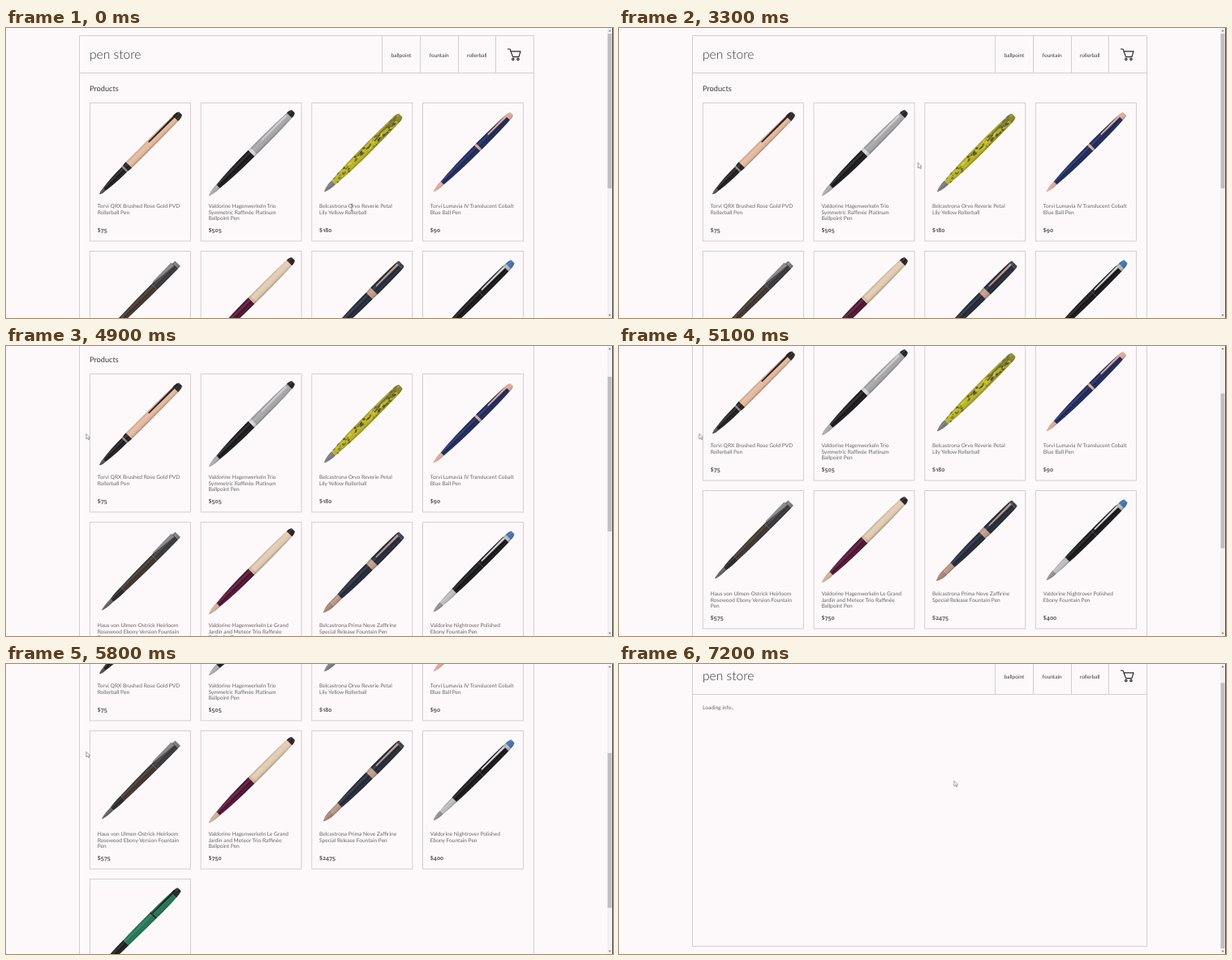
An HTML page for the animation above (8 s loop, 748 px wide and 358 px high).

```html
<!DOCTYPE html>
<html lang="en">
<head>
<meta charset="utf-8">
<title>pen store</title>
<style>
  html, body { margin: 0; width: 100%; height: 100%; overflow: hidden; background: #fdf9fa; }
  svg { display: block; width: 748px; height: 358px; }
  text { font-family: Lato, "Open Sans", sans-serif; font-size: 6.6px; fill: #686567; text-rendering: geometricPrecision; }
  .logo { font-size: 15.6px; font-weight: 300; fill: #333; }
  .heading { font-size: 9.2px; fill: #3c3a3b; }
  .nav { font-size: 6.5px; text-anchor: middle; fill: #3c3a3b; }
  .price { font-family: "Open Sans", "Noto Sans", sans-serif; font-size: 7.1px; font-weight: 600; font-variant-numeric: oldstyle-nums; fill: #454244; }
  .line { fill: none; stroke: #d3cfd1; }
</style>
</head>
<body>
<svg viewBox="0 0 748 358">
  <defs>
    <linearGradient id="shade" x2="0" y2="1">
      <stop offset="0" stop-color="#000" stop-opacity=".12"/>
      <stop offset=".3" stop-color="#fff" stop-opacity=".16"/>
      <stop offset=".55" stop-color="#fff" stop-opacity="0"/>
      <stop offset="1" stop-color="#000" stop-opacity=".3"/>
    </linearGradient>
  </defs>
  <g id="page">
    <path id="frame" class="line"/>
    <path class="line" d="M90.5 55.5H650.5M463.5 9.5v46M510.5 9.5v46M557.5 9.5v46M603.5 9.5v46"/>
    <text class="logo" x="103" y="38">pen store</text>
    <text class="nav" x="487" y="35.5">ballpoint</text>
    <text class="nav" x="533.7" y="35.5">fountain</text>
    <text class="nav" x="580.3" y="35.5">rollerball</text>
    <g fill="none" stroke="#2b292a" stroke-width="1.2" stroke-linejoin="round">
      <path d="M618 26h3l3.6 9.6h7.4l2-6.8h-12"/>
      <circle cx="624.8" cy="38.6" r="1.2"/><circle cx="631" cy="38.6" r="1.2"/>
    </g>
    <g id="products"><text class="heading" x="103" y="77.5">Products</text></g>
    <text id="loading" x="103" y="55.7" dy="18">Loading info..</text>
  </g>
  <path fill="#f3f0f1" d="M741 0h6v358h-6z"/>
  <path fill="#777" d="M742.3 4.2l1.7-2 1.7 2zM742.3 353.8l1.7 2 1.7-2z"/>
  <rect id="thumb" x="741.4" width="5" fill="#c0bebf"/>
  <path fill="#444" d="M747 0h1v358h-1z"/>
  <path id="beam" d="M424.5 217.5h3M424.5 225.5h3M426 217.5v8" stroke="#777" stroke-width=".8"/>
  <path id="arrow" d="M.4 .3v6.6l1.6-1.4 1.2 2.4 1-.5-1.1-2.3h2.1z" fill="#fff" stroke="#777" stroke-width=".7"/>
</svg>
<script>
const LOOP = 8000, STEP = 100, VIEW = 358;
const SCROLL_START = 4600, SCROLL_EASE = 5400, SCROLL_END = 6000, PAGE_CHANGE = 7200;
const el = id => document.getElementById(id);

function add(parent, tag, attrs, text = '') {
  const node = document.createElementNS('http://www.w3.org/2000/svg', tag);
  for (const name in attrs) node.setAttribute(name, attrs[name]);
  node.textContent = text;
  return parent.appendChild(node);
}

// parts run from the tip upwards: [colour, distance of the far end, half width there]
const products = [
  { title: ['Torvi QRX Brushed Rose Gold PVD', 'Rollerball Pen'], price: '$75', tip: [12, 112.5],
    parts: [['#4a4849', 8, 2.2], ['#1a181a', 43, 4.4], ['#8a8081', 45, 4.6], ['#1d1b1d', 51, 5.2], ['#e6b99c', 132, 4.6], ['#2a2627', 141, 2.6]],
    clip: ['#262223', 88, 139] },
  { title: ['Valdorine Hagenwerkeln Trio', 'Symmetric Raffinée Platinum', 'Ballpoint Pen'], price: '$505', tip: [10, 114.5],
    parts: [['#a9a9ab', 16, 3], ['#141417', 74, 5.4], ['#d5d5d7', 78, 5.6], ['#a6a6a9', 140, 4.4], ['#1c1c1e', 147, 2.4]],
    clip: ['#cfcfd1', 94, 137] },
  { title: ['Belcastrona Orvo Reverie Petal', 'Lily Yellow Rollerball'], price: '$180', tip: [15.5, 109.5], marbled: true,
    parts: [['#77777b', 16, 3.4], ['#b9b31f', 75, 5.7], ['#b9b31f', 124, 5], ['#8b8628', 133, 3]],
    clip: ['#77743a', 92, 128] },
  { title: ['Torvi Lumavia IV Translucent Cobalt', 'Blue Ball Pen'], price: '$90', tip: [13.5, 109.5],
    parts: [['#dfa794', 15, 2.7], ['#182457', 76, 5], ['#dfa794', 79, 5.1], ['#182457', 129, 4], ['#dfa794', 136, 2.4]],
    clip: ['#e0ab9a', 97, 132] },
  { title: ['Haus von Ulmen-Ostrick Heirloom', 'Rosewood Ebony Version Fountain', 'Pen'], price: '$575', tip: [15, 108.5],
    parts: [['#5c5b5d', 17, 2.4], ['#232224', 36, 3.8], ['#3a2f29', 91, 4.9], ['#343335', 128, 4.6], ['#77777a', 132, 4.2]],
    clip: ['#8b8b8e', 94, 127], raised: 2.6 },
  { title: ['Valdorine Hagenwerkeln Le Grand', 'Jardin and Meteor Trio Raffinée', 'Ballpoint Pen'], price: '$750', tip: [10, 113.5],
    parts: [['#cfae91', 16, 3], ['#4c0d2d', 74, 5.4], ['#d9b79a', 78, 5.6], ['#e2cbb0', 140, 4.6], ['#241b1d', 147, 2.4]],
    clip: ['#e6cdb4', 94, 137] },
  { title: ['Belcastrona Prima Nove Zaffirine', 'Special Release Fountain Pen'], price: '$2475', tip: [14.5, 111.5],
    parts: [['#a78272', 15, 3.6], ['#bb9380', 28, 3.8], ['#1d2433', 80, 5.6], ['#c39a85', 88, 6], ['#1f2635', 132, 5.4], ['#353a48', 136, 4.2]],
    clip: ['#c49d89', 94, 132] },
  { title: ['Valdorine Nightrover Polished', 'Ebony Fountain Pen'], price: '$400', tip: [13.5, 110.5],
    parts: [['#8d8d90', 14, 2.8], ['#bcbcbf', 36, 4], ['#111113', 82, 5.1], ['#111113', 126, 4.8], ['#b8b8bb', 130, 4.4], ['#3c6fae', 138, 2.6]],
    clip: ['#d4d4d6', 86, 126] },
  { title: [], price: '', tip: [12, 111],
    parts: [['#4a4849', 8, 2.2], ['#151817', 46, 4.6], ['#1d7355', 92, 5.2], ['#17251f', 95, 5.2], ['#1d7355', 129, 4.4], ['#1c2421', 139, 2.6]],
    clip: ['#1b2822', 94, 134] },
];

// Sides bulge towards the wider end of a part.
function partOutline(start, half, end, endHalf) {
  const bend = start + (end - start) * (endHalf > half ? 0.4 : 0.75), wide = Math.max(half, endHalf);
  return `M${start} ${-half}Q${bend} ${-wide} ${end} ${-endHalf}V${endHalf}Q${bend} ${wide} ${start} ${half}z`;
}

function drawPen(card, { parts, tip, clip, marbled, raised = 0 }) {
  const pen = add(card, 'g', { transform: `translate(${tip}) rotate(-45)` });
  let start = 0, half = 0.5;
  for (const [fill, end, endHalf] of parts) {
    const d = partOutline(start, half, end, endHalf);
    add(pen, 'path', { d, fill });
    add(pen, 'path', { d, fill: 'url(#shade)' });
    [start, half] = [end, endHalf];
  }
  if (marbled) drawMarbling(pen);
  const [fill, from, to] = clip;
  add(pen, 'path', { d: `M${from} ${-3.4 - raised}L${to} ${-4 - raised}V-1.4L${from} ${-1.8 - raised}z`, fill });
}

function drawMarbling(pen) {
  let seed = 7;
  const random = () => (seed = seed * 16807 % 2147483647) / 2147483647;
  const tones = ['#35341f', '#5b5926', '#dcd733', '#7f7f78', '#45442a'];
  for (let i = 0; i < 90; i++) {
    add(pen, 'ellipse', {
      cx: 20 + random() * 104, cy: random() * 8 - 4, rx: 1 + random() * 2, ry: 0.5 + random() * 0.8,
      fill: tones[i % tones.length], opacity: 0.75,
    });
  }
}

products.forEach((product, i) => {
  const x = 103.4 + i % 4 * 136.7, y = 92.5 + Math.floor(i / 4) * 183;
  const card = add(el('products'), 'g', { transform: `translate(${x} ${y})` });
  add(card, 'rect', { class: 'line', width: 124, height: 170.5 });
  drawPen(card, product);
  product.title.forEach((line, row) => add(card, 'text', { x: 9.3, y: 129.7 + row * 7.5 }, line));
  add(card, 'text', { class: 'price', x: 9.3, y: 159.3 }, product.price);
});

// [time, x, y]
const cursorPath = [
  [3300, 368, 166], [4100, 45.5, 89], [4400, 45.5, 89], [4600, 98.5, 108],
  [6300, 98.5, 108], [6800, 425, 168], [7000, 412.5, 144],
];

function cursorAt(t) {
  const next = cursorPath.findIndex(key => key[0] > t);
  if (next < 0) return cursorPath.at(-1).slice(1);
  const [t0, x0, y0] = cursorPath[next - 1], [t1, x1, y1] = cursorPath[next];
  const p = (t - t0) / (t1 - t0), e = p * p * (3 - 2 * p);
  return [x0 + (x1 - x0) * e, y0 + (y1 - y0) * e];
}

function scrollAt(t) {
  if (t >= PAGE_CHANGE) return 18;
  if (t < SCROLL_EASE) return Math.round(Math.max(0, t - SCROLL_START) * 155 / (SCROLL_EASE - SCROLL_START));
  const left = Math.max(0, (SCROLL_END - t) / (SCROLL_END - SCROLL_EASE));
  return Math.round(194 - 39 * left ** 3);
}

const show = (id, visible) => el(id).setAttribute('visibility', visible ? 'visible' : 'hidden');

function render(now) {
  const t = Math.floor(now % LOOP / STEP) * STEP;
  const loading = t >= PAGE_CHANGE, scroll = scrollAt(t);
  const bottom = loading ? 366.5 : 641.5;
  const scale = (VIEW - 14) / (loading ? 376 : 645);

  show('products', !loading);
  show('loading', loading);
  el('frame').setAttribute('d', `M90.5 9.5H650.5V${bottom}H90.5z`);
  el('page').setAttribute('transform', `translate(0 ${-scroll})`);
  el('thumb').setAttribute('y', 7 + scroll * scale);
  el('thumb').setAttribute('height', VIEW * scale);

  show('beam', t < 1900);
  show('arrow', t >= 3300);
  if (t >= 3300) el('arrow').setAttribute('transform', `translate(${cursorAt(t)})`);
}

const begin = performance.now();
function tick() {
  render(performance.now() - begin);
  requestAnimationFrame(tick);
}
tick();
</script>
</body>
</html>
```
